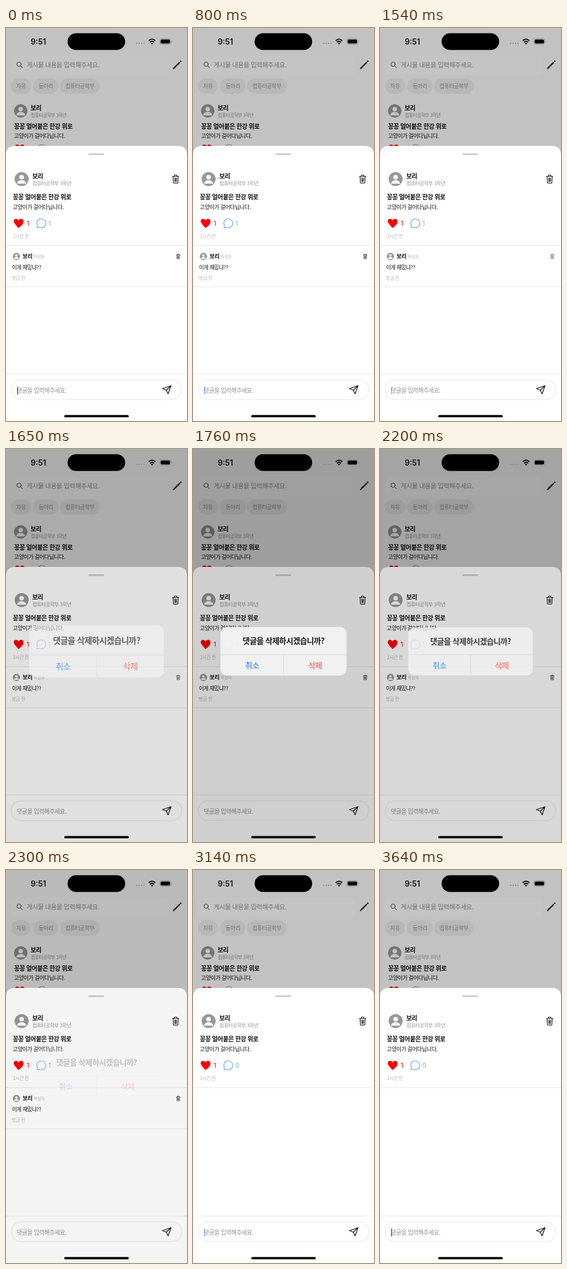
These frames come from a looping animation (295x640 px, 4060 ms). An HTML page:

```html
<!DOCTYPE html>
<html lang="ko">
<head>
<meta charset="utf-8">
<style>
  html, body { margin: 0; width: 100%; height: 100%; overflow: hidden; background: #fff; }
  svg { display: block; width: 100vw; height: 100vh; }
  text { font: 9px "Noto Sans CJK KR", "Noto Sans CJK", sans-serif; letter-spacing: -.045em; fill: #111; }
  .b { font-weight: 600; }
  .mid { text-anchor: middle; }
  .num { font-family: Inter, sans-serif; letter-spacing: 0; }
  .s7 { font-size: 7.5px; }
  .s8 { font-size: 8.2px; }
  .s10 { font-size: 10.1px; }
  .s13 { font-size: 12.76px; }
  .gray { fill: #929292; }
  .pale { fill: #b4b4b4; }
  .red { fill: #f00; }
  .blue { fill: #7eabee; }
  .line { fill: none; stroke: #111; stroke-linecap: round; stroke-linejoin: round; }
  .rule { stroke: #e9e9e9; stroke-width: 1; }
</style>
</head>
<body>
<svg viewBox="0 0 295 640" preserveAspectRatio="none">
  <defs>
    <clipPath id="disc"><circle r="11.5"/></clipPath>
    <g id="avatar" clip-path="url(#disc)">
      <circle r="11.5" fill="#989898"/>
      <circle cy="-3" r="3.8" fill="#fff"/>
      <path d="M-7.4 7.6C-7.4 0 7.4 0 7.4 7.6Z" fill="#fff"/>
    </g>
    <g id="trash" class="line" stroke-width="1">
      <path d="M-5.2-4.2H5.2M-2-4.4V-6.4H2V-4.4M-4.2-4-3.6 6.6H3.6L4.2-4M-1.7-1.6-1.5 4.2M1.7-1.6 1.5 4.2M0-1.6V4.2"/>
    </g>
    <path id="heart" fill="#f00" d="M0 7.7C-3 5.2-8-1.8-8-2.8C-8-8-2-8.5 0-4.5C2-8.5 8-8 8-2.8C8 1.8 3 5.2 0 7.7Z"/>
    <path id="bubble" fill="none" stroke="#7eabee" stroke-width="1.2" stroke-linejoin="round" d="M-7 7.3L-6.2 3.8A7.3 7.3 0 1 1-3.4 6.5Z"/>
  </defs>

  <!-- page behind the sheet -->
  <rect width="295" height="640" fill="#fcfcfc"/>
  <rect x="8" y="45" width="256" height="31" rx="6" fill="#fff"/>
  <g class="line" stroke-width="1" style="stroke:#444"><circle cx="21.3" cy="59" r="3.5"/><path d="M24 61.8 26.8 64.7"/></g>
  <text class="gray" x="33.5" y="63.6" style="font-size:10.6px">게시물 내용을 입력해주세요.</text>
  <path class="line" stroke-width="2.2" style="stroke-linecap:butt" d="M273.4 65.6 283.3 55.7M284 55 285.6 53.4"/>
  <path d="M272 67.3 272.7 64.9 274.3 66.5Z" fill="#111"/>
  <g fill="#efefef">
    <rect x="8" y="82" width="33" height="25" rx="12.5"/>
    <rect x="44" y="82" width="42" height="25" rx="12.5"/>
    <rect x="88" y="82" width="65" height="25" rx="12.5"/>
  </g>
  <text class="mid gray" x="24.5" y="97.7">자유</text>
  <text class="mid gray" x="65" y="97.7">동아리</text>
  <text class="mid gray" x="120.3" y="97.7">컴퓨터공학부</text>
  <use href="#avatar" transform="translate(24 135) scale(.96)"/>
  <text class="b s10" x="40" y="134">보리</text>
  <text class="s7 gray" x="40.5" y="144.8">컴퓨터공학부 3학년</text>
  <text class="b s10" x="13" y="163.6">꽁꽁 얼어붙은 한강 위로</text>
  <text x="13" y="179.2">고양이가 걸어다닙니다.</text>
  <use href="#heart" x="22.5" y="197"/>
  <use href="#bubble" x="58.5" y="197"/>
  <rect width="295" height="640" opacity=".23"/>

  <!-- sheet -->
  <path d="M0 640V207Q0 192 15 192H280Q295 192 295 207V640Z" fill="#fff"/>
  <rect x="134" y="204" width="26" height="3" rx="1.5" fill="#d0d0d0"/>
  <use href="#avatar" x="25.5" y="246"/>
  <text class="b s10" x="42.7" y="244.5">보리</text>
  <text class="s8 gray" x="43" y="255.9">컴퓨터공학부 3학년</text>
  <use href="#trash" x="276.5" y="246"/>
  <text class="b s10" x="11" y="278.6">꽁꽁 얼어붙은 한강 위로</text>
  <text x="11" y="295.2">고양이가 걸어다닙니다.</text>
  <use href="#heart" x="20.5" y="318"/>
  <text class="num red" x="33.5" y="321.5" style="font-size:10.5px">1</text>
  <use href="#bubble" x="57.5" y="318"/>
  <text class="num blue" id="count" x="69" y="321.5" style="font-size:10.5px">1</text>
  <text class="s7 pale" x="11.5" y="341.6">2시간 전</text>
  <path class="rule" d="M0 354.5H295M0 563.5H295"/>

  <g id="comment">
    <use href="#avatar" transform="translate(17 372) scale(.53)"/>
    <text class="b" x="27" y="375.3">보리</text>
    <text class="pale" x="45" y="374.5" style="font-size:6.8px">작성자</text>
    <g id="bin"><use href="#trash" transform="translate(280.7 372) scale(.6)"/></g>
    <text x="9.7" y="393.4" style="font-size:8.7px">이게 재밌냐??</text>
    <text class="s7 pale" x="9.5" y="409.8">방금 전</text>
    <path class="rule" d="M0 421.5H295"/>
  </g>

  <rect x="9" y="573" width="277" height="32" rx="14" fill="#fff" stroke="#e6e6e6"/>
  <text class="gray" x="17.5" y="593.8" style="font-size:9.7px">댓글을 입력해주세요.</text>
  <path class="line" stroke-width="1.2" d="M269 582.5 255 587.3 261.2 589.8 264.2 595.8ZM261.2 589.8 269 582.5"/>
  <rect id="caret" x="18" y="584" width="1.6" height="13" rx=".8" fill="#3a5ce5"/>

  <!-- alert -->
  <rect id="dim" width="295" height="640"/>
  <g id="alert">
    <rect x="-101.5" y="-39" width="203" height="78" rx="10" fill="#f4f4f4"/>
    <path d="M-101.5 5.5H101.5M.3 5.5V39" stroke="#d2d2d2" stroke-width=".7"/>
    <text class="mid b s13" y="-12">댓글을 삭제하시겠습니까?</text>
    <text class="mid s13" x="-50.5" y="27.3" style="fill:#087aff">취소</text>
    <text class="mid s13" x="51" y="27.3" style="fill:#ff3b30">삭제</text>
  </g>

  <!-- status bar and home indicator -->
  <rect x="100.4" y="8.5" width="93.8" height="27.3" rx="13.65"/>
  <text class="num b" x="40.3" y="26.8" style="font-size:12.6px">9:51</text>
  <g fill="#888"><circle cx="213" cy="25" r="1.1"/><circle cx="217" cy="25" r="1.1"/><circle cx="221" cy="25" r="1.1"/><circle cx="225" cy="25" r="1.1"/></g>
  <g class="line" stroke-width="1.9" style="stroke-linecap:butt">
    <path d="M232.6 20.8Q238 15.8 243.4 20.8M234.6 23.2Q238 20.1 241.4 23.2"/>
  </g>
  <path d="M238 27 236.1 24.9Q238 23.4 239.9 24.9Z"/>
  <rect x="250.6" y="17.4" width="18.2" height="9.2" rx="3" fill="none" stroke="#888" stroke-width=".8"/>
  <rect x="252" y="18.8" width="15.4" height="6.4" rx="1.9"/>
  <path d="M270 20.4Q271.4 22 270 23.6Z" fill="#888"/>
  <rect x="95" y="630.3" width="105" height="3.7" rx="1.85"/>
</svg>
<script>
const LOOP = 4060;
const ticks = [0, 560, 800, 920, 1430, 1540, 1650, 1760, 1870, 1980, 2090,
  2200, 2300, 2410, 2510, 2630, 3140, 3240, 3520, 3640];
// [time, opacity], each held until the next
const caretKeys = [[0, 1], [560, 0], [800, .5], [920, 1], [1540, .45], [1650, 0],
  [2510, .5], [2630, 1], [3140, .5], [3240, 0], [3520, .5], [3640, 1]];
const binKeys = [[0, 1], [1430, .5], [1540, .7], [1650, .8], [1760, 1]];

const $ = id => document.getElementById(id);
const [caret, bin, comment, count, dim, alertBox] =
  ['caret', 'bin', 'comment', 'count', 'dim', 'alert'].map($);
const clamp = x => Math.max(0, Math.min(1, x));
const held = (keys, t) => keys.findLast(k => k[0] <= t)[1];
const fade = (el, a) => el.setAttribute('opacity', a);

function draw(time) {
  const t = ticks.findLast(k => k <= time);
  const shown = clamp(1 - Math.exp((1597 - t) / 58));
  const left = clamp((2340 - t) / 182);
  const deleted = t >= 3140;

  fade(caret, held(caretKeys, t));
  fade(bin, held(binKeys, t));
  fade(comment, deleted ? 0 : 1);
  count.textContent = deleted ? 0 : 1;
  fade(dim, .2 * shown * left);
  fade(alertBox, shown * left);
  alertBox.setAttribute('transform', `translate(147.5 329.5) scale(${1.2 - .2 * shown})`);
}

const start = performance.now();
function loop() {
  draw((performance.now() - start) % LOOP);
  requestAnimationFrame(loop);
}
loop();
</script>
</body>
</html>
```
